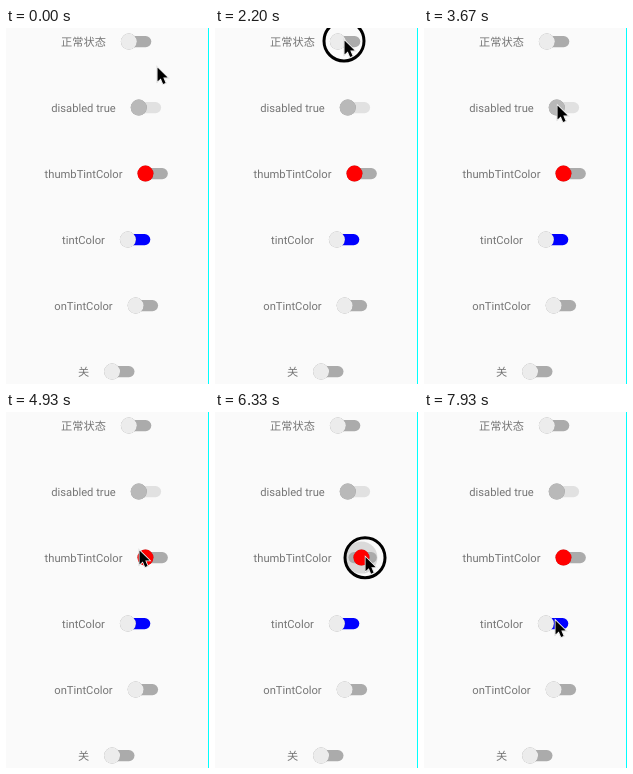
An HTML page for the animation above (8 s loop, 203 px wide and 356 px high).

```html
<!DOCTYPE html>
<html>
<head>
<meta charset="utf-8">
<style>
html, body { margin: 0; width: 100%; height: 100%; overflow: hidden; background: #fafafa; }
svg { display: block; width: 203px; height: 356px; }
text { font: 11.2px Roboto, "Noto Sans CJK SC", "Noto Sans CJK", sans-serif; fill: #757575; text-rendering: geometricPrecision; }
.thumb { filter: drop-shadow(0 .8px .7px rgba(0, 0, 0, .4)); }
#cursor { filter: drop-shadow(0 .7px .6px rgba(0, 0, 0, .35)); }
</style>
</head>
<body>
<svg viewBox="0 0 203 356">
  <rect width="203" height="356" fill="#fafafa"/>
  <rect x="202" width="1" height="356" fill="#0ff"/>
  <g id="rows"></g>
  <circle id="ring" r="20" fill="none" stroke="#000" stroke-width="3"/>
  <path id="cursor" d="M1.5 1.4V15.6L4.8 12.5 7.1 18 9.6 16.9 7.3 11.6H11.7Z" stroke="#fff" stroke-width="1.5" paint-order="stroke"/>
</svg>
<script>
const LOOP = 8000, FPS = 15;
const CENTER = 100, ROW = 66, GAP = 23, REACH = 22, TRAVEL = 16;
const $ = id => document.getElementById(id);

const clamp = (v, a = 0, b = 1) => Math.min(b, Math.max(a, v));
const ease = p => p * p * (3 - 2 * p);
const ramp = (t, a, b) => clamp((t - a) / (b - a));
const hump = (t, a, b) => Math.sin(Math.PI * ramp(t, a, b));

// each row is a label and a switch, centred together
function makeRow(label, i, { thumb = '#ececec', track = '#ababab' } = {}) {
  const g = document.createElementNS('http://www.w3.org/2000/svg', 'g');
  g.setAttribute('transform', `translate(0 ${13.6 + ROW * i})`);
  g.innerHTML = `<text y="4.2">${label}</text>
    <circle class="ripple" r="16" opacity="0"/>
    <rect x="-6" y="-5.6" width="28.4" height="11.2" rx="5.6" fill="${track}"/>
    <circle class="thumb" r="8" fill="${thumb}"/>`;
  $('rows').append(g);
  const [text, ripple, bar, knob] = g.children;
  const half = (text.getComputedTextLength() + GAP + REACH) / 2;
  const home = CENTER + half - REACH;
  text.setAttribute('x', CENTER - half);
  bar.setAttribute('transform', `translate(${home} 0)`);

  const set = (shift, glow) => {
    for (const c of [ripple, knob]) c.setAttribute('cx', home + shift);
    ripple.setAttribute('opacity', .13 * glow);
  };
  set(0, 0);
  return set;
}

const switches = [
  ['正常状态'],
  ['disabled true', { thumb: '#b9b9b9', track: '#e1e1e1' }],
  ['thumbTintColor', { thumb: '#f00' }],
  ['tintColor', { track: '#00f' }],
  ['onTintColor'],
  ['关']
].map(([label, colors], i) => makeRow(label, i, colors));

// pointer moves: start tick, end tick, destination
const start = [150, 38];
const moves = [
  [1, 11, 129, 13], [13, 15, 128, 11], [42, 49, 132, 76], [60, 61, 134, 83],
  [67, 74, 132, 137], [74, 79, 140, 144], [91, 102, 170, 143],
  [104, 112, 130, 207], [112, 116, 139, 149], [116, 119, 130, 207]
];
const pointer = t => moves.reduce(([x, y], [a, b, toX, toY]) => {
  const p = ease(ramp(t, a, b));
  return [x + (toX - x) * p, y + (toY - y) * p];
}, start);

// taps per row, each held for HOLD ticks, and one drag
const HOLD = 3, DRAG = 91, DROP = 104;
const taps = [[18, 33], [52, 62], [80]];
const pressed = t => t >= DRAG && t < DROP || taps.flat().some(a => t >= a && t < a + HOLD);
const bounce = (row, t) => taps[row].reduce((sum, a) => sum + hump(t, a + HOLD - 1, a + 8), 0);

function draw(now) {
  const t = Math.floor(now % LOOP * FPS / 1000 + .06);
  const [x, y] = pointer(t);
  $('cursor').setAttribute('transform', `translate(${x} ${y})`);
  $('ring').setAttribute('transform', `translate(${x + 1} ${y + 2})`);
  $('ring').setAttribute('opacity', pressed(t) ? 1 : 0);

  const nudge = bounce(0, t), tap = bounce(2, t);
  switches[0](4 * nudge, nudge);

  // the dragged thumb follows the pointer, then slides back
  const drag = t < DRAG ? 0 : clamp(x - 142, 0, TRAVEL);
  const slide = t > DROP ? TRAVEL * (1 - ease(ramp(t, DROP, DROP + 5))) : drag;
  const glow = ramp(t, DRAG, DRAG + 3) * (1 - ramp(t, DROP + 1, DROP + 6));
  switches[2](slide + 4 * tap, tap + glow);
  requestAnimationFrame(draw);
}
requestAnimationFrame(draw);
</script>
</body>
</html>
```
